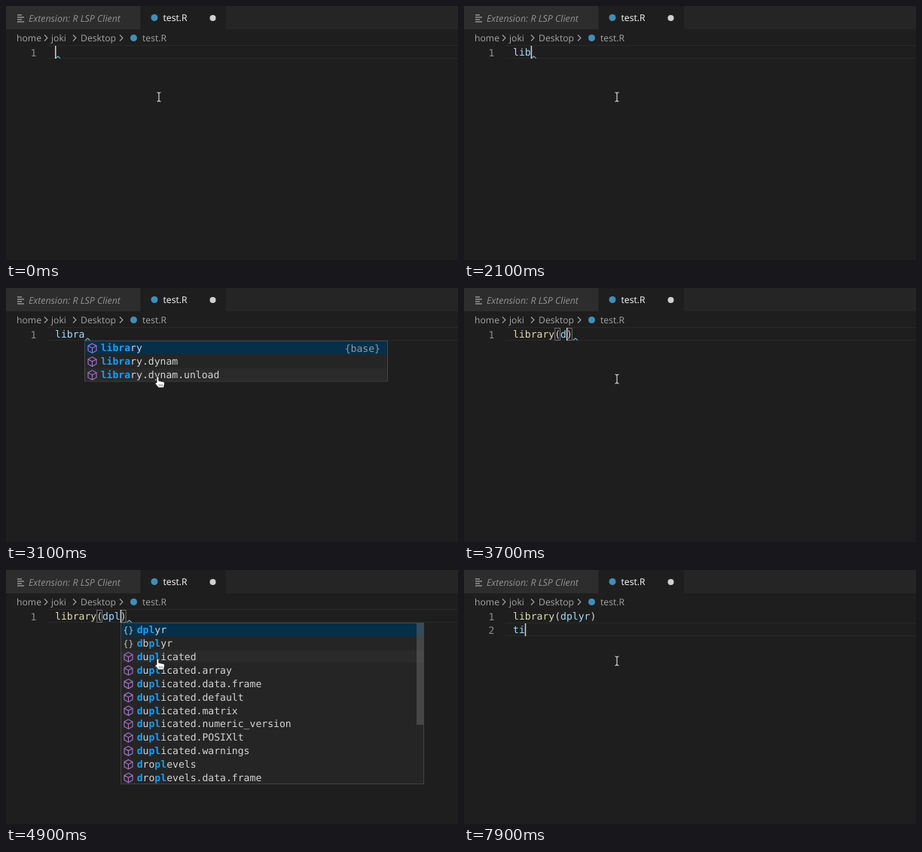
An HTML page that plays this animation: 600 by 338 pixels, repeating every 8 s.

```html
<!DOCTYPE html>
<html lang="en">
<head>
<meta charset="utf-8">
<style>
  html, body { margin: 0; width: 100%; height: 100%; overflow: hidden; background: #1f1e1f; }
  svg { display: block; width: 600px; height: 338px; }
  text { white-space: pre; text-rendering: geometricPrecision; }
  .ui { font: 12.2px "Open Sans", "Noto Sans", sans-serif; fill: #a4a4a4; }
  .code { font: 13.1px "DejaVu Sans Mono", monospace; fill: #d4d4d4; }
  .hit { font-weight: bold; fill: #1a9df0; }
  .line { fill: none; stroke-width: 1.1; }
</style>
</head>
<body>
<svg viewBox="0 0 600 338">
  <rect width="600" height="338" fill="#1f1e1f"/>
  <rect width="600" height="31" fill="#262526"/>
  <rect width="178" height="31" fill="#2d2d2d"/>
  <rect x="179" width="113" height="31" fill="#1f1e1f"/>
  <path class="line" stroke="#c5c5c5" d="M15 12h6M15 15h9M15 18h6M15 21h9"/>
  <circle cx="197" cy="15.500" r="4.500" fill="#3f8fb8"/>
  <circle cx="169.500" cy="42.500" r="4.500" fill="#3f8fb8"/>
  <circle cx="274.500" cy="16" r="4" fill="#d0d0d0"/>
  <g class="ui">
    <text x="30" y="20.500" font-size="12.400" font-style="italic" fill="#929292" style="font-size:12.4px">Extension: R LSP Client</text>
    <text x="208.500" y="20" style="fill:#fff">test.R</text>
    <text x="14" y="47">home</text>
    <text x="60" y="47">joki</text>
    <text x="99" y="47">Desktop</text>
    <text x="181" y="47">test.R</text>
  </g>
  <path class="line" stroke="#a4a4a4" d="M51 38.500l4 4-4 4M89 38.500l4 4-4 4M151 38.500l4 4-4 4"/>
  <g id="editor"></g>
</svg>
<script>
const LOOP = 8000, BLINK = 350, CHAR = 7.886, LEFT = 65, ROW = 17.85;
const editor = document.getElementById('editor');

const libraryList = {
  match: /^()()(libra)/, detail: '{base}',
  items: ['library', 'library.dynam', 'library.dynam.unload']
};
const packageList = {
  match: /^(d)(.*?)(pl)/, modules: 2, scroll: true,
  items: ['dplyr', 'dbplyr',
    ...['', '.array', '.data.frame', '.default', '.matrix', '.numeric_version', '.POSIXlt', '.warnings']
      .map(s => 'duplicated' + s),
    'droplevels', 'droplevels.data.frame']
};

// Each key press: time, text with | as the caret, open suggestion list
const keys = [
  [100, '|'], [1200, 'l|'], [1600, 'li|'], [1900, 'lib|'], [2250, 'libr|'],
  [2500, 'libra|', libraryList], [3250, 'library|'], [3450, 'library(|)'],
  [3700, 'library(d|)'], [3850, 'library(dp|)'], [4100, 'library(dpl|)', packageList],
  [5000, 'library(dplyr|)'], [5250, 'library(dplyr)|'], [5900, 'library(dplyr)\n|'],
  [7600, 'library(dplyr)\nt|'], [7800, 'library(dplyr)\nti|']
];

const rect = (x, y, w, h, fill, more = '') =>
  `<rect x="${x}" y="${y}" width="${w}" height="${h}" fill="${fill}" ${more}/>`;
const path = (d, stroke, more = '') => `<path class="line" d="${d}" stroke="${stroke}" ${more}/>`;
const text = (x, y, s, more = '') => `<text class="code" x="${x}" y="${y}" ${more}>${s}</text>`;

const colour = s => s.replace(/\w+/g, (word, at) =>
  `<tspan fill="${s[at + word.length] === '(' ? '#dcdcaa' : '#9cdcfe'}">${word}</tspan>`);

function icon(x, y, module) {
  if (module) return text(x - 7, y + 4, '{}', 'style="font-size:11.5px;fill:#c5c5c5"');
  return path(`M${x} ${y - 6}l5.500 3v6.500l-5.500 3-5.500-3v-6.500zM${x - 5.5} ${y - 3}l5.500 3 5.500-3M${x} ${y}v6.500`, '#a873cf');
}

function popup(x, list, age) {
  const h = list.items.length * ROW;
  let out = rect(x + .5, 70.5, 402, h, '#252526', 'stroke="#454545"');
  list.items.forEach((item, i) => {
    const y = 71 + i * ROW, mid = y + ROW / 2;
    if (i === 0) out += rect(x + 1, y, 401, ROW - .5, '#062f4a');
    if (i === 2) out += rect(x + 1, y, 401, ROW - 1, '#2a2a2b');
    const label = item.replace(list.match, (_, a, b, c) =>
      `<tspan class="hit">${a}</tspan>${b}<tspan class="hit">${c}</tspan>`);
    out += icon(x + 10.5, mid, i < list.modules) + text(x + 21.7, mid + 4.5, label);
  });
  if (list.detail) out += text(x + 393, 84.5, list.detail, 'text-anchor="end" style="fill:#8f9ba5"');
  if (list.scroll) out += rect(x + 393, 71, 9, 135, '#797979', `opacity="${Math.min(.4, .1 + age / 2000)}"`);
  return out;
}

const beam = path('M200.500 115q2.500 0 2.500 1.500v9q0 1.500-2.500 1.500M205.500 115q-2.500 0-2.500 1.500M205.500 127q-2.500 0-2.500-1.500', '#e0e0e0');
const hand = '<path d="M200 119.500q0-1.500 1.400-1.500t1.400 1.500v4l6.200 1.200q1.500.4 1.500 2l-1 6h-7l-4.500-5.500q-.6-1.600 2-1.200z" fill="#fff" stroke="#111" stroke-width=".8"/>'
  + path('M203.300 128v3M205.300 128v3M207.300 128v3', '#333', 'style="stroke-width:.6"');

function draw(t) {
  const [since, value, list] = keys.findLast(k => k[0] <= t) || keys[0];
  const age = Math.max(0, t - since);
  const lines = value.split('\n'), row = lines.length - 1, top = 53 + row * 18;
  const caret = lines[row].indexOf('|'), active = lines[row].replace('|', '');
  const caretX = LEFT + caret * CHAR, endX = LEFT + active.length * CHAR;

  let out = path(`M55 ${top - .5}H600M55 ${top + 16.5}H600`, '#2a292a');
  if (active.includes('(')) {
    for (const at of [7, active.length - 1])
      out += rect(LEFT + at * CHAR + .5, top + .5, CHAR - 1, 16, 'none', 'stroke="#777" stroke-width=".9"');
  }
  lines.forEach((line, i) => {
    out += text(40.5, 66.5 + i * 18, i + 1, 'text-anchor="end" style="fill:#8c8c8c"');
    out += text(LEFT, 66 + i * 18, colour(line.replace('|', '')));
  });
  if (since < 5250) out += path(`M${endX + 1} 69.500l3-2.500 3 2.500`, '#6fb7c4');
  if (Math.floor(age / BLINK) % 2 === 0) out += rect(caretX, top, 1.5, 17, '#d0d0d0');
  if (list) out += popup(Math.round(caretX), list, age);
  editor.innerHTML = out + (list ? hand : beam);
}

const start = performance.now();
function tick() {
  draw((performance.now() - start) % LOOP);
  requestAnimationFrame(tick);
}
tick();
</script>
</body>
</html>
```
